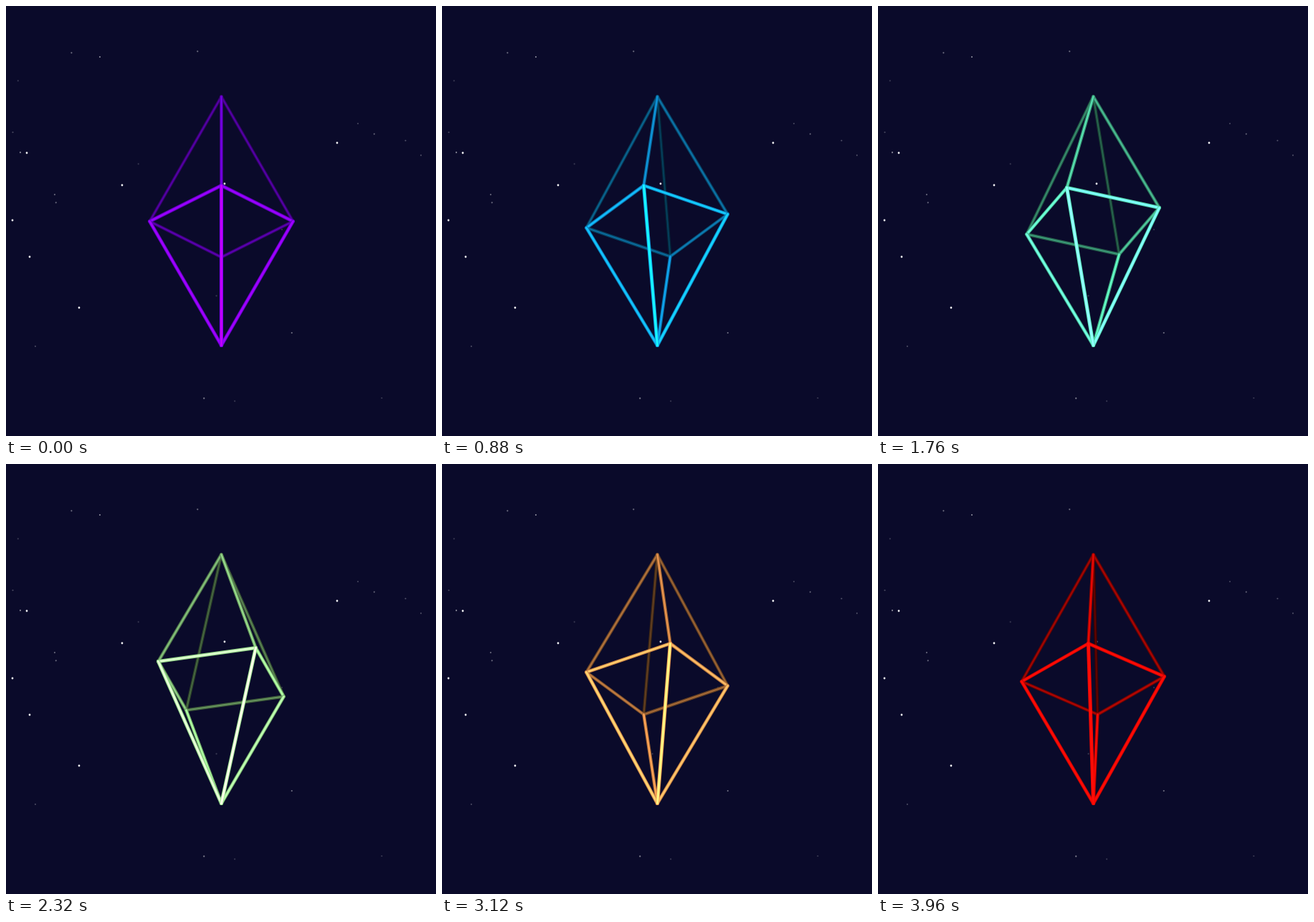
These frames come from a looping animation (600x600 px, 4000 ms). An HTML page with a canvas:

```html
<!DOCTYPE html>
<html lang="en">
<head>
<meta charset="utf-8">
<title>Spinning crystal</title>
<style>
  html, body { margin: 0; width: 100%; height: 100%; overflow: hidden; background: #0a0a2a; }
  canvas { display: block; width: 600px; height: 600px; }
</style>
</head>
<body>
<canvas id="stage" width="600" height="600"></canvas>
<script>
const ctx = document.getElementById('stage').getContext('2d');
const SIZE = 600, FRAMES = 100, STEP = 40;
const CENTER = 300, RADIUS = 100, HEIGHT = 200, TILT = Math.PI / 6;

const BRIGHT_STARS = [[29, 205], [462, 191], [162, 250], [305, 248], [9, 299], [33, 350], [102, 421]];
const FAINT_STARS = 20;

function seededRandom(seed) {
  return () => (seed = (seed * 16807) % 2147483647) / 2147483647;
}

function drawStar(x, y, radius, light) {
  ctx.fillStyle = `rgba(255,255,255,${light})`;
  ctx.beginPath();
  ctx.arc(x, y, radius, 0, 2 * Math.PI);
  ctx.fill();
}

function drawStars() {
  const random = seededRandom(2024);
  for (let i = 0; i < FAINT_STARS; i++) {
    drawStar(SIZE * random(), 60 + 500 * random(), 1.1, .1 + .45 * random());
  }
  for (const [x, y] of BRIGHT_STARS) drawStar(x, y, 1.4, .95);
}

// Violet through blue, green and orange to red for t in 0..1
function rainbow(t) {
  return [Math.min(1, Math.abs(2 * t - .5)), Math.sin(Math.PI * t), Math.cos(Math.PI * t / 2)];
}

function shade(color, level) {
  return `rgb(${color.map(c => Math.round(255 * Math.min(1, c * level))).join(',')})`;
}

// Corners snap to whole pixels
const snap = v => Math.floor(CENTER + v + 1e-6) + .5;

function project(x, y, z) {
  const c = Math.cos(TILT), s = Math.sin(TILT);
  return { x: snap(x), y: snap(y * c - z * s), depth: y * s + z * c };
}

function crystalEdges(angle) {
  const top = project(0, -HEIGHT, 0), bottom = project(0, HEIGHT, 0);
  const ring = [0, 1, 2, 3].map(i => {
    const a = angle + i * Math.PI / 2;
    return project(RADIUS * Math.sin(a), 0, RADIUS * Math.cos(a));
  });
  return ring
    .flatMap((p, i) => [[top, p], [p, ring[(i + 1) % 4]], [p, bottom]])
    .map(([a, b]) => ({ a, b, depth: (a.depth + b.depth) / 2 }))
    .sort((p, q) => p.depth - q.depth);
}

function strokeEdge({ a, b }, width, style) {
  ctx.lineWidth = width;
  ctx.strokeStyle = style;
  ctx.beginPath();
  ctx.moveTo(a.x, a.y);
  ctx.lineTo(b.x, b.y);
  ctx.stroke();
}

function draw(frame) {
  const t = frame / FRAMES, color = rainbow(t);
  ctx.fillStyle = '#0a0a2a';
  ctx.fillRect(0, 0, SIZE, SIZE);
  drawStars();
  ctx.lineCap = 'round';
  for (const edge of crystalEdges(2 * Math.PI * t)) {
    const level = .95 + .006 * edge.depth;
    strokeEdge(edge, 4.7 + .004 * edge.depth, shade(color, level * .62));
    strokeEdge(edge, 2.5 + .008 * edge.depth, shade(color, level));
  }
}

const start = performance.now();
function tick() {
  draw(Math.floor((performance.now() - start) / STEP) % FRAMES);
  requestAnimationFrame(tick);
}
tick();
</script>
</body>
</html>
```
